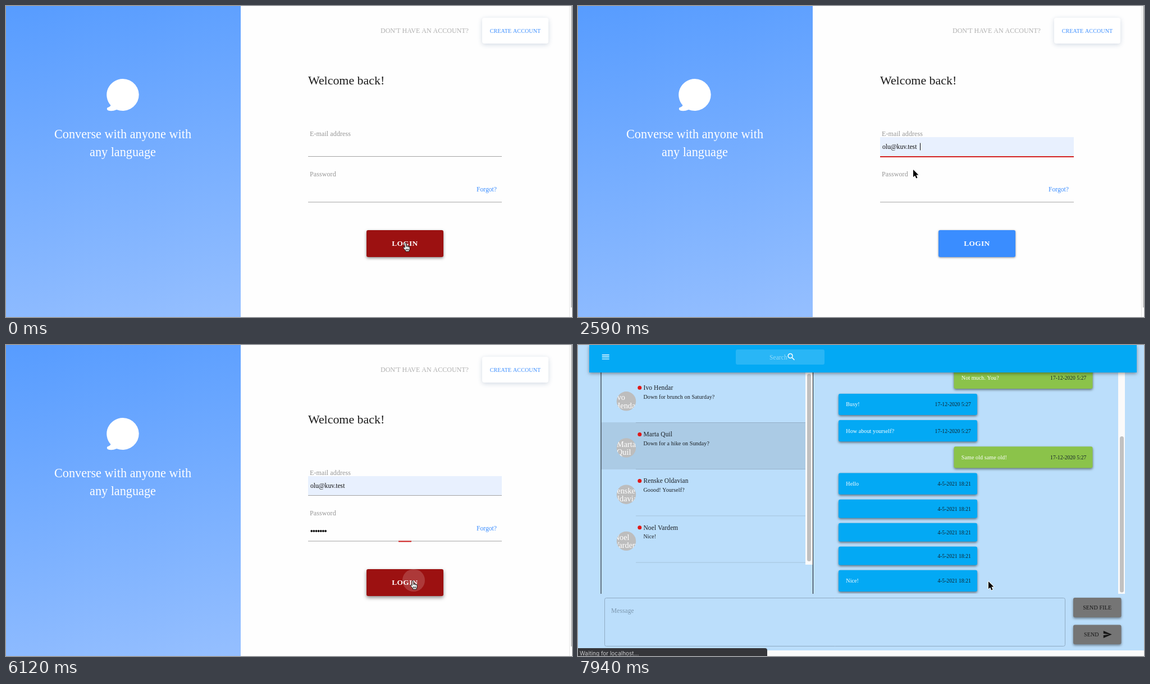
Animation, 1008 px wide and 555 px high, one loop 8 s. Source, as an HTML page with a canvas:

```html
<!DOCTYPE html>
<html lang="en">
<head>
<meta charset="utf-8">
<title>Login to chat</title>
<style>
  html, body { margin: 0; width: 100%; height: 100%; overflow: hidden; background: #fff; }
  canvas { display: block; width: 1008px; height: 555px; }
</style>
</head>
<body>
<canvas id="stage"></canvas>
<script>
const W = 1008, H = 555, LOOP = 8000;
const SERIF = '"Liberation Serif", "Times New Roman", serif';
const SANS = 'Inter, sans-serif';
const BLUE = '#3a8dff', RED = '#9c1111', LINE_RED = '#d32020';
const EMAIL = 'olu@kuv.test';

const canvas = document.getElementById('stage');
const ctx = canvas.getContext('2d');
const ratio = window.devicePixelRatio || 1;
canvas.width = W * ratio;
canvas.height = H * ratio;

const suggestions = [EMAIL, 'dorniavek@vomil.test', 'velnormek@vomil.test',
  'korvisel@vomil.test', 'kebkebkeb', 'pemdoli4@vomil.test'];

const contacts = [
  ['Ivo Hendar', 'Down for brunch on Saturday?'],
  ['Marta Quil', 'Down for a hike on Sunday?'],
  ['Renske Oldavian', 'Goood! Yourself?'],
  ['Noel Vardem', 'Nice!']
];

const messages = [
  [true, 'Hi there!', '17-12-2020 5:24'],
  [false, 'Hello!', '17-12-2020 5:24'],
  [false, 'Sup?', '17-12-2020 5:26'],
  [true, 'Not much. You?', '17-12-2020 5:27'],
  [false, 'Busy!', '17-12-2020 5:27'],
  [false, 'How about yourself?', '17-12-2020 5:27'],
  [true, 'Same old same old!', '17-12-2020 5:27'],
  [false, 'Hello', '4-5-2021 18:21'],
  [false, '', '4-5-2021 18:21'],
  [false, '', '4-5-2021 18:21'],
  [false, '', '4-5-2021 18:21'],
  [false, 'Nice!', '4-5-2021 18:21']
];

const icons = {
  menu: new Path2D('M3 18h18v-2H3v2zm0-5h18v-2H3v2zm0-7v2h18V6H3z'),
  search: new Path2D('M15.5 14h-.79l-.28-.27A6.47 6.47 0 0 0 16 9.5 6.5 6.5 0 1 0 9.5 16c1.61 0 3.09-.59 4.23-1.57l.27.28v.79l5 4.99L20.49 19l-4.99-5zm-6 0C7 14 5 12 5 9.5S7 5 9.5 5 14 7 14 9.5 12 14 9.5 14z'),
  send: new Path2D('M2 21L23 12 2 3v7l15 2-15 2z')
};
const arrow = new Path2D('M0 0V13.2L3.1 10.4 5.3 15.4 7.5 14.4 5.3 9.6H9.4Z');
const hand = new Path2D('M-1.4 1Q-1.4-.4 0-.4T1.4 1V5.2Q2.2 4.3 3.6 5.2 4.8 4.6 5.6 6 7.6 5.8 7.6 7.8V10.5Q7.4 12 6.6 13V15H0V13.4L-3.4 9.4Q-4.4 7.8-3.6 7.2-2.6 6.6-1.4 8.4Z');
const bubble = new Path2D('M208 130A29 28.5 0 1 1 197 185Q189 188.5 182 186.5 178.5 184.5 180.5 181.5 186 179.5 186.5 177.3A29 28.5 0 0 1 208 130Z');

// Each step changes part of the state and holds until the next one.
// Underlines are half widths of the red focus bar; 172.5 is full.
const steps = [
  [0, { page: 'login', button: RED, lift: 2, cursor: ['hand', 711.5, 423],
        email: 0, emailBar: 0, emailHover: 0, passBar: 0, passHover: 0,
        menu: 0, pick: -1, dots: 0, caret: '', ripple: null, status: 0, scroll: 0 }],
  [600, { cursor: ['beam', 608.5, 251.5] }],
  [980, { button: BLUE, lift: 1, emailHover: 1 }],
  [1730, { menu: 1, caret: 'email', emailBar: 133 }],
  [1880, { emailBar: 172.5 }],
  [2030, { cursor: ['arrow', 604, 268] }],
  [2300, { cursor: ['arrow', 598, 288], pick: 0, email: 1, emailHover: 0 }],
  [2450, { cursor: ['arrow', 597, 292] }],
  [2590, { menu: 0, pick: -1 }],
  [2740, { cursor: ['arrow', 597, 293] }],
  [3010, { cursor: ['beam', 600.5, 323] }],
  [3160, { cursor: ['beam', 601, 337.5], passHover: 1 }],
  [3310, { caret: 'pass', emailBar: 0, passBar: 133 }],
  [3450, { passBar: 172.5, dots: 1 }],
  [3600, { dots: 2 }],
  [3750, { dots: 3 }],
  [4340, { dots: 4 }],
  [4490, { dots: 5 }],
  [4640, { dots: 6 }],
  [4940, { dots: 7 }],
  [5230, { cursor: ['hand', 724.5, 421], passHover: 0 }],
  [5680, { button: '#6b4f88', lift: 2, caret: '' }],
  [5830, { button: RED, caret: 'pass' }],
  [6120, { caret: '', passBar: 11.5, ripple: [20, .17], lift: 3 }],
  [6270, { passBar: 0, ripple: [58, .17] }],
  [6410, { ripple: [90, .08], lift: 2 }],
  [6560, { ripple: null }],
  [6890, { cursor: ['arrow', 731, 424.5] }],
  [7070, { status: 7 }],
  [7220, { status: 14 }],
  [7430, { page: 'chat' }],
  [7580, { cursor: ['arrow', 731, 423] }],
  [7940, { scroll: 154.4, cursor: ['arrow', 731, 422] }]
];

function stateAt(t) {
  return Object.assign({}, ...steps.filter(s => s[0] <= t).map(s => s[1]));
}

function rect(x, y, w, h, color) {
  ctx.fillStyle = color;
  ctx.fillRect(x, y, w, h);
}

function round(x, y, w, h, r, color) {
  ctx.beginPath();
  ctx.roundRect(x, y, w, h, r);
  ctx.fillStyle = color;
  ctx.fill();
}

function disc(x, y, r, color) {
  ctx.beginPath();
  ctx.arc(x, y, r, 0, 7);
  ctx.fillStyle = color;
  ctx.fill();
}

function shadowed(dy, blur, color, draw) {
  ctx.save();
  ctx.shadowColor = color;
  ctx.shadowBlur = blur * ratio;
  ctx.shadowOffsetY = dy * ratio;
  draw();
  ctx.restore();
}

function text(str, x, y, size, color, { align = 'left', gap = 0, weight = 400, family = SERIF } = {}) {
  ctx.font = `${weight} ${size}px ${family}`;
  ctx.letterSpacing = gap + 'px';
  ctx.textAlign = align;
  ctx.fillStyle = color;
  ctx.fillText(str, x, y);
}

function icon(name, x, y, color) {
  ctx.save();
  ctx.translate(x, y);
  ctx.scale(.716, .716);
  ctx.fillStyle = color;
  ctx.fill(icons[name]);
  ctx.restore();
}

function underline(y, bar, hover) {
  if (hover) rect(538, y, 345, 2, '#111');
  else rect(538, y, 345, 1, '#a3a3a3');
  if (bar) rect(710.5 - bar, y, bar * 2, 2, LINE_RED);
}

function drawSidePanel() {
  const tilt = .21, end = H + 418 * tilt, k = end / (1 + tilt * tilt);
  const g = ctx.createLinearGradient(0, 0, k * tilt, k);
  g.addColorStop(0, '#579cff');
  g.addColorStop(1, '#95bfff');
  rect(0, 0, 418, H, g);
  ctx.fillStyle = '#fff';
  ctx.fill(bubble);
  text('Converse with anyone with', 208, 236, 22.25, '#fff', { align: 'center' });
  text('any language', 208, 268, 22.25, '#fff', { align: 'center' });
}

function drawLoginButton(s) {
  shadowed(s.lift, 2 + s.lift * 1.5, 'rgba(0,0,0,.45)', () => round(642, 400, 137, 48, 3, s.button));
  if (s.ripple) {
    ctx.save();
    ctx.beginPath();
    ctx.roundRect(642, 400, 137, 48, 3);
    ctx.clip();
    disc(726, 420, s.ripple[0], `rgba(255,255,255,${s.ripple[1]})`);
    ctx.restore();
  }
  text('LOGIN', 710.4, 428, 13.3, '#fff', { align: 'center', weight: 700, gap: .35 });
}

function drawSuggestions(pick) {
  shadowed(1, 3, 'rgba(0,0,0,.4)', () => round(537, 270, 346, 199, [2, 2, 4, 4], '#292a2d'));
  if (pick >= 0) rect(537, 278 + pick * 30.9, 346, 31, '#3f4042');
  suggestions.forEach((name, i) =>
    text(name, 547, 297 + i * 30.9, 11.4, '#e8eaed', { weight: 500, family: SANS }));
}

function drawLogin(s) {
  rect(0, 0, W, H, '#fefefe');
  drawSidePanel();
  rect(1003, 0, 1, H, '#e6e6e6');
  rect(1006, 0, 2, 538, '#c1c1c1');

  text("DON'T HAVE AN ACCOUNT?", 667, 47.5, 12, '#b0b0b0');
  shadowed(2, 8, 'rgba(74,106,149,.25)', () => round(848, 21, 118, 46, 4, '#fff'));
  text('CREATE ACCOUNT', 907, 47.5, 10, BLUE, { align: 'center', gap: .15 });
  text('Welcome back!', 538, 140, 21.9, '#1b1b1b');

  text('E-mail address', 541, 232, 12, '#969696', { gap: .1 });
  if (s.email) {
    rect(538, 234, 345, 35, '#e8f0fe');
    text(EMAIL, 542, 255, 11.65, '#111');
  }
  underline(268, s.emailBar, s.emailHover);

  text('Password', 541, 304, 12, '#969696', { gap: .1 });
  for (let i = 0; i < s.dots; i++) disc(544.2 + i * 4.15, 332, 1.9, '#111');
  text('Forgot?', 838, 330.5, 11.6, BLUE);
  underline(349.5, s.passBar, s.passHover);

  if (s.caret === 'email') rect(s.email ? 609 : 542, 244.5, 1, 13, '#111');
  if (s.caret === 'pass') rect(542 + s.dots * 4.15, 326, 1, 13, '#111');
  drawLoginButton(s);
  if (s.menu) drawSuggestions(s.pick);
}

function drawAvatar(name, cy) {
  ctx.save();
  disc(86, cy, 17.2, '#bdbdbd');
  ctx.clip();
  ctx.font = `14.3px ${SERIF}`;
  ctx.letterSpacing = '0px';
  const words = name.split(' ');
  const left = 86 - Math.max(...words.map(w => ctx.measureText(w).width)) / 2;
  words.forEach((w, i) => text(w, left, cy - 2 + i * 14.3, 14.3, '#fff'));
  ctx.restore();
}

function drawContacts() {
  rect(40.5, 49, 1, 395, '#111');
  rect(418, 49, 1, 395, '#111');
  contacts.forEach(([name, last], i) => {
    const y = 83.2 * i;
    if (i === 1) rect(41.5, 138, 363.5, 84, 'rgba(0,0,0,.085)');
    rect(103, y + 138, 302, 1, 'rgba(0,0,0,.13)');
    drawAvatar(name, y + 100.3);
    disc(109.8, y + 76.2, 3.5, '#e01818');
    text(name, 116.5, y + 80, 11.46, '#1a1f24', { gap: .1 });
    text(last, 116.5, y + 95.5, 10.02, '#1a1f24', { gap: .1 });
  });
  rect(405, 49, 13, 343, '#fafafa');
  round(408, 51.5, 7, 334.5, 3.5, '#c1c1c1');
}

function drawMessages(scroll) {
  ctx.save();
  ctx.beginPath();
  ctx.rect(419, 49, 556, 395);
  ctx.clip();
  let y = 52.5 - scroll;
  for (const [mine, body, stamp] of messages) {
    const x = mine ? 669.5 : 464, h = body ? 38.2 : 33, base = y + h / 2 + 3.3;
    shadowed(2, 4, 'rgba(0,0,0,.5)', () => round(x, y, 247, h, 3, mine ? '#8bc34a' : '#03a9f4'));
    text(body, x + 13.3, base, 10.02, '#fff', { gap: .1 });
    text(stamp, x + 235.8, base, 9.6, '#15222b', { align: 'right' });
    y += h + 9;
  }
  rect(962, 49, 12, 395, '#fafafa');
  round(965, 51.5 + scroll * .722, 7, 278.5, 3.5, '#c1c1c1');
  ctx.restore();
}

function greyButton(y, h) {
  shadowed(2, 4, 'rgba(0,0,0,.45)', () => round(882, y, 85.5, h, 3, '#757575'));
}

function drawChat(s) {
  rect(0, 0, W, H, '#bbdefb');
  rect(0, 545, W, 10, '#fafafa');
  drawContacts();
  drawMessages(s.scroll);

  shadowed(2, 6, 'rgba(0,0,0,.4)', () => rect(20, 0, 975, 49, '#03a9f4'));
  icon('menu', 40.6, 12.7, '#fff');
  round(281, 8, 158, 27, 3, 'rgba(255,255,255,.15)');
  text('Search', 341, 25.5, 11.46, 'rgba(255,255,255,.5)', { gap: .1 });
  icon('search', 371.3, 12.6, '#fff');

  ctx.beginPath();
  ctx.roundRect(47.5, 451.5, 820, 86, 3);
  ctx.lineWidth = 1;
  ctx.strokeStyle = '#8fabc3';
  ctx.stroke();
  text('Message', 59, 478, 11.46, '#7c97ae', { gap: .1 });

  greyButton(451, 35);
  text('SEND FILE', 924.7, 472, 10.02, '#161616', { align: 'center', gap: .15 });
  greyButton(499.5, 34.5);
  text('SEND', 901, 520.3, 10.02, '#161616', { gap: .15 });
  icon('send', 934.3, 507.9, '#161616');
}

function drawStatus(rise) {
  if (!rise) return;
  round(-4, H - rise, 341, 20, 4, '#35363a');
  text('Waiting for localhost...', 3, H - rise + 13, 10, '#c9cacc', { family: SANS });
}

function drawBeam() {
  const path = new Path2D('M-3-6Q0-6 0-4.4 0-6 3-6M0-4.4V4.6M-3 6.2Q0 6.2 0 4.6 0 6.2 3 6.2M-1.6 1.8H1.6');
  ctx.lineWidth = 2.6;
  ctx.strokeStyle = 'rgba(255,255,255,.8)';
  ctx.stroke(path);
  ctx.lineWidth = 1.2;
  ctx.strokeStyle = '#111';
  ctx.stroke(path);
}

function drawCursor([kind, x, y]) {
  ctx.save();
  ctx.translate(x, y);
  ctx.lineJoin = 'round';
  if (kind === 'beam') drawBeam();
  else if (kind === 'arrow') {
    ctx.lineWidth = 1.8;
    ctx.strokeStyle = '#fff';
    ctx.stroke(arrow);
    ctx.fillStyle = '#000';
    ctx.fill(arrow);
  } else {
    ctx.fillStyle = '#fff';
    ctx.fill(hand);
    ctx.lineWidth = 1;
    ctx.strokeStyle = '#111';
    ctx.stroke(hand);
    ctx.stroke(new Path2D('M1.4 5.2V7.4M3.6 5.2V7.6M5.6 6V8M1 10V13M3 10V13M5 10V13'));
  }
  ctx.restore();
}

const start = performance.now();

function frame() {
  const s = stateAt((performance.now() - start) % LOOP);
  ctx.setTransform(ratio, 0, 0, ratio, 0, 0);
  (s.page === 'login' ? drawLogin : drawChat)(s);
  drawStatus(s.status);
  drawCursor(s.cursor);
  requestAnimationFrame(frame);
}
frame();
</script>
</body>
</html>
```
